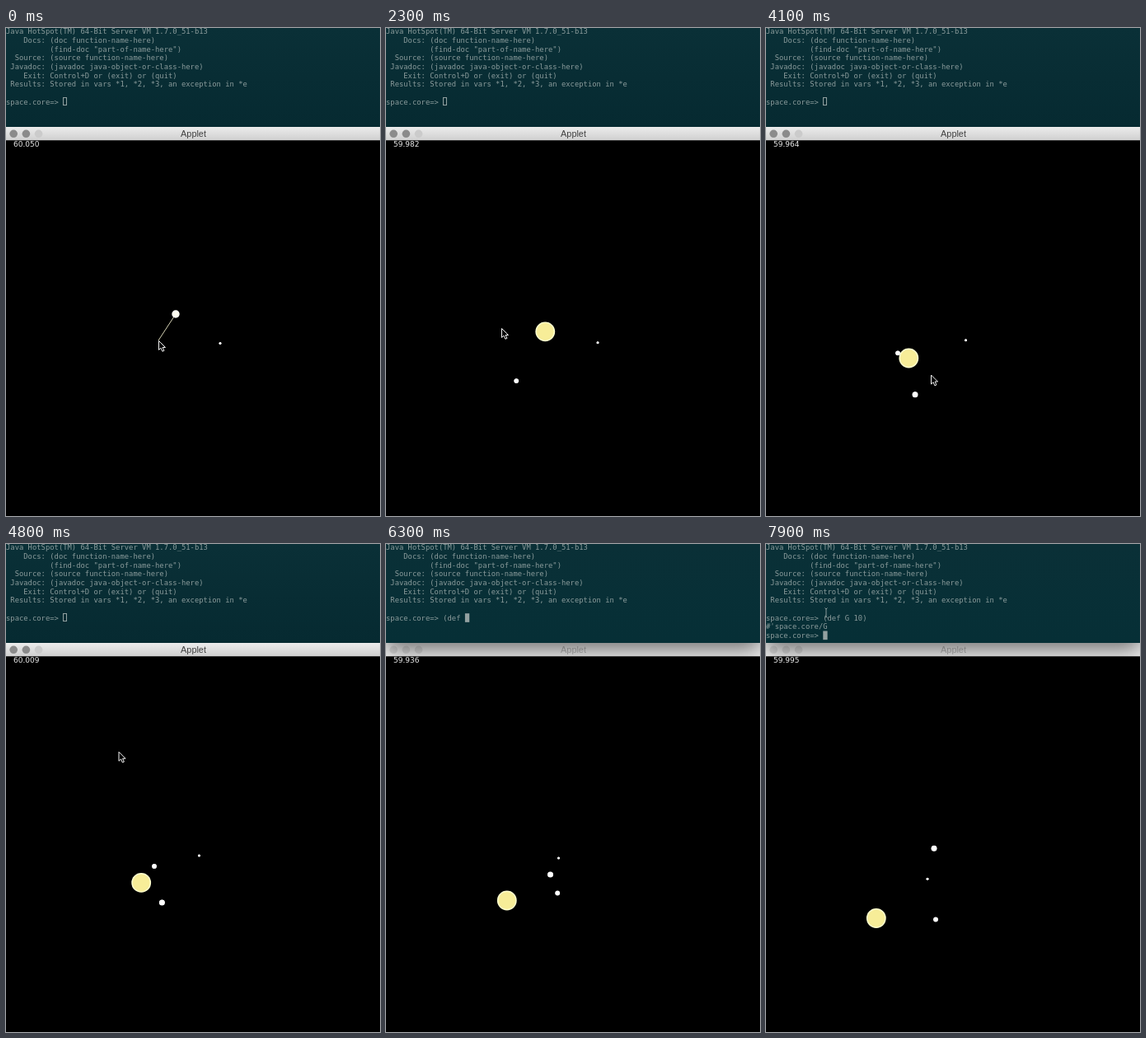
Recreate the animation shown at these times as an HTML page with a canvas. Size 454 by 592 pixels, loop 8 s.

```html
<!DOCTYPE html>
<html lang="en">
<head>
<meta charset="utf-8">
<title>Gravity applet</title>
<style>
  html, body { margin: 0; width: 100%; height: 100%; overflow: hidden; background: #000; }
  canvas { display: block; }
</style>
</head>
<body>
<canvas id="stage" width="454" height="592"></canvas>
<script>
const ctx = document.getElementById('stage').getContext('2d');
const LOOP = 8000, STEP = 100, WIDTH = 454, BAR_TOP = 120, BAR_HEIGHT = 16.5;
const FOCUS = 5100, TYPE_START = 5600, KEY_GAP = 165, ENTER = 7500;
const CHAR = 5.328, LINE = 10.65, GROWTH = 0.0065;

const BANNER = [
  'Java HotSpot(TM) 64-Bit Server VM 1.7.0_51-b13',
  '    Docs: (doc function-name-here)',
  '          (find-doc "part-of-name-here")',
  '  Source: (source function-name-here)',
  ' Javadoc: (javadoc java-object-or-class-here)',
  '    Exit: Control+D or (exit) or (quit)',
  ' Results: Stored in vars *1, *2, *3, an exception in *e',
  ''
];
const PROMPT = 'space.core=> ';
const COMMAND = '(def G 10)';

// Paths are a few [time, x, y] key points. A body starts moving at its first one.
const pointer = [
  [0, 185, 379], [1000, 171.5, 402], [1880, 158.5, 429], [2300, 140, 364],
  [2700, 163, 477], [3250, 207, 424], [4000, 200, 420.5], [4500, 200, 420.5], [5100, 73, 83]
];
const sun = [[1130, 206, 347], [4100, 173.3, 400.5], [5200, 159, 416.5], [6300, 146.8, 432.5], [7900, 133.8, 454]];
const moon = [[1150, 260, 382.5], [2300, 257, 381.7], [4100, 242.5, 378.8], [5200, 228.8, 378], [6300, 209.5, 381], [7900, 196, 406.2]];
const inner = [[2280, 158.2, 428.5], [4100, 160, 394.3], [4600, 174, 389], [5200, 191, 398.5], [6300, 208.2, 423.5], [7900, 206, 455.5]];
const outer = [[3250, 171, 455], [4100, 181, 444.7], [5200, 193.4, 428], [6300, 199.5, 401], [7900, 204, 369.2]];
const bodies = [
  { path: sun, press: -690, radius: 11.9 },
  { path: moon, press: -1000, radius: 1.5 },
  { path: inner, press: 1880, radius: 2.9 },
  { path: outer, press: 2800, radius: 3.5 }
];

const clamp = (v, lo, hi) => Math.max(lo, Math.min(hi, v));

// flow 1 coasts through the key points, flow 0 eases to a stop at each.
function at(path, t, flow) {
  const last = path.length - 1;
  t = clamp(t, path[0][0], path[last][0]);
  const i = Math.max(0, path.findIndex(p => p[0] >= t) - 1);
  const a = path[i], b = path[i + 1];
  const span = b[0] - a[0], u = (t - a[0]) / span;
  const slope = (k, c) => {
    const p = path[Math.max(k - 1, 0)], q = path[Math.min(k + 1, last)];
    return flow * (q[c] - p[c]) / (q[0] - p[0]) * span;
  };
  return [1, 2].map(c =>
    a[c] + (b[c] - a[c]) * u * u * (3 - 2 * u) +
    slope(i, c) * u * (1 - u) ** 2 - slope(i + 1, c) * u * u * (1 - u));
}

function text(s, x, y, font, color, align = 'left') {
  ctx.font = font;
  ctx.fillStyle = color;
  ctx.textAlign = align;
  ctx.fillText(s, x, y);
}

function disc(x, y, r, color) {
  ctx.fillStyle = color;
  ctx.beginPath();
  ctx.arc(x, y, r, 0, 2 * Math.PI);
  ctx.fill();
}

function shade(y, h, top, bottom) {
  const g = ctx.createLinearGradient(0, y, 0, y + h);
  g.addColorStop(0, top);
  g.addColorStop(1, bottom);
  ctx.fillStyle = g;
  ctx.fillRect(0, y, WIDTH, h);
}

function drawTerminal(t, focused) {
  shade(0, BAR_TOP, '#0a3037', focused ? '#062f36' : '#062a31');
  const typed = clamp(Math.floor((t - TYPE_START) / KEY_GAP) + 1, 0, COMMAND.length);
  const lines = [...BANNER, PROMPT + COMMAND.slice(0, typed)];
  if (t >= ENTER) lines.push("#'space.core/G", PROMPT);
  lines.forEach((s, i) =>
    text(s, 0, 7.4 + i * LINE, '8.85px "DejaVu Sans Mono", monospace', '#8a9b9b'));

  const row = lines.length - 1, x = lines[row].length * CHAR, y = row * LINE - 1;
  if (focused) {
    ctx.fillStyle = '#93a1a1';
    ctx.fillRect(x, y, CHAR, LINE);
  } else {
    ctx.strokeStyle = '#93a1a1';
    ctx.lineWidth = 1;
    ctx.strokeRect(69.5, 84.5, 4, 9);
  }
}

function drawTitleBar(covered) {
  ctx.save();
  ctx.beginPath();
  ctx.rect(0, BAR_TOP, WIDTH, BAR_HEIGHT);
  ctx.clip();
  if (covered) shade(BAR_TOP, BAR_HEIGHT, '#f0f0f0', '#f0f0f0');
  else shade(BAR_TOP, BAR_HEIGHT, '#ececec', '#cfcfcf');
  const button = covered ? '#dadada' : '#8b8b8b';
  [button, button, covered ? button : '#cbcbcb'].forEach((c, i) => disc(9.2 + i * 15.2, 128.3, 4.8, c));
  text('Applet', 227.5, 132, '10.9px "Liberation Sans", Arial, sans-serif',
    covered ? '#b4b4b4' : '#404040', 'center');
  if (covered) {
    // The terminal window casts its shadow down onto the bar.
    ctx.shadowColor = 'rgba(0, 0, 0, 0.54)';
    ctx.shadowBlur = 25;
    ctx.shadowOffsetY = 8;
    ctx.fillStyle = '#000';
    ctx.fillRect(0, 0, WIDTH, BAR_TOP);
  }
  ctx.restore();
}

function frameRate(t) {
  const dip = t > FOCUS ? 6.3 * Math.exp((5200 - t) / 200) : 0;
  return 60.05 + 0.15 * Math.sin(t * t * 0.129) - dip;
}

function drawBody({ path, press, radius }, t) {
  if (t < press) return;
  const [x, y] = at(path, t, 1);
  const r = Math.min(radius, (t - press) * GROWTH + 0.2);
  if (t < path[0][0] && path !== moon) {
    ctx.strokeStyle = '#d5d2b4';
    ctx.lineWidth = 1;
    ctx.beginPath();
    ctx.moveTo(x, y);
    ctx.lineTo(...at(pointer, t, 0));
    ctx.stroke();
  }
  const heat = clamp((r - 4) / 5, 0, 1);
  disc(x, y, r, `rgb(255, 255, ${255 - 48 * heat})`);
  disc(x, y, r * 0.88, `rgb(${255 - 8 * heat}, ${255 - 18 * heat}, ${255 - 103 * heat})`);
}

function drawPointer(t) {
  const [x, y] = at(pointer, t, 0);
  ctx.lineWidth = 1;
  if (t >= FOCUS) {
    const typing = t >= TYPE_START && t < ENTER;
    ctx.strokeStyle = '#8a9b9b';
    if (!typing) ctx.stroke(new Path2D('M71.5 77.5 L73 79 L74.5 77.5 M73 79 V88 M71.5 89.5 L73 88 L74.5 89.5'));
    return;
  }
  ctx.save();
  ctx.translate(x + 0.5, y + 0.5);
  const arrow = new Path2D('M0 0 V11 L2.6 8.7 L4.4 12.8 L6.4 11.9 L4.6 8 H8 Z');
  ctx.fillStyle = '#000';
  ctx.fill(arrow);
  ctx.strokeStyle = '#f4f4f4';
  ctx.stroke(arrow);
  ctx.restore();
}

function draw(t) {
  const focused = t >= FOCUS;
  ctx.fillStyle = '#000';
  ctx.fillRect(0, 0, WIDTH, 592);
  drawTerminal(t, focused);
  drawTitleBar(focused);
  text(frameRate(t).toFixed(3), 9, 144.3, '9px "DejaVu Sans", sans-serif', '#e8e8e8');
  bodies.forEach(b => drawBody(b, t));
  drawPointer(t);
}

const start = performance.now();
function tick() {
  const t = (performance.now() - start) % LOOP;
  draw(Math.floor(t / STEP) * STEP);
  requestAnimationFrame(tick);
}
tick();
</script>
</body>
</html>
```
